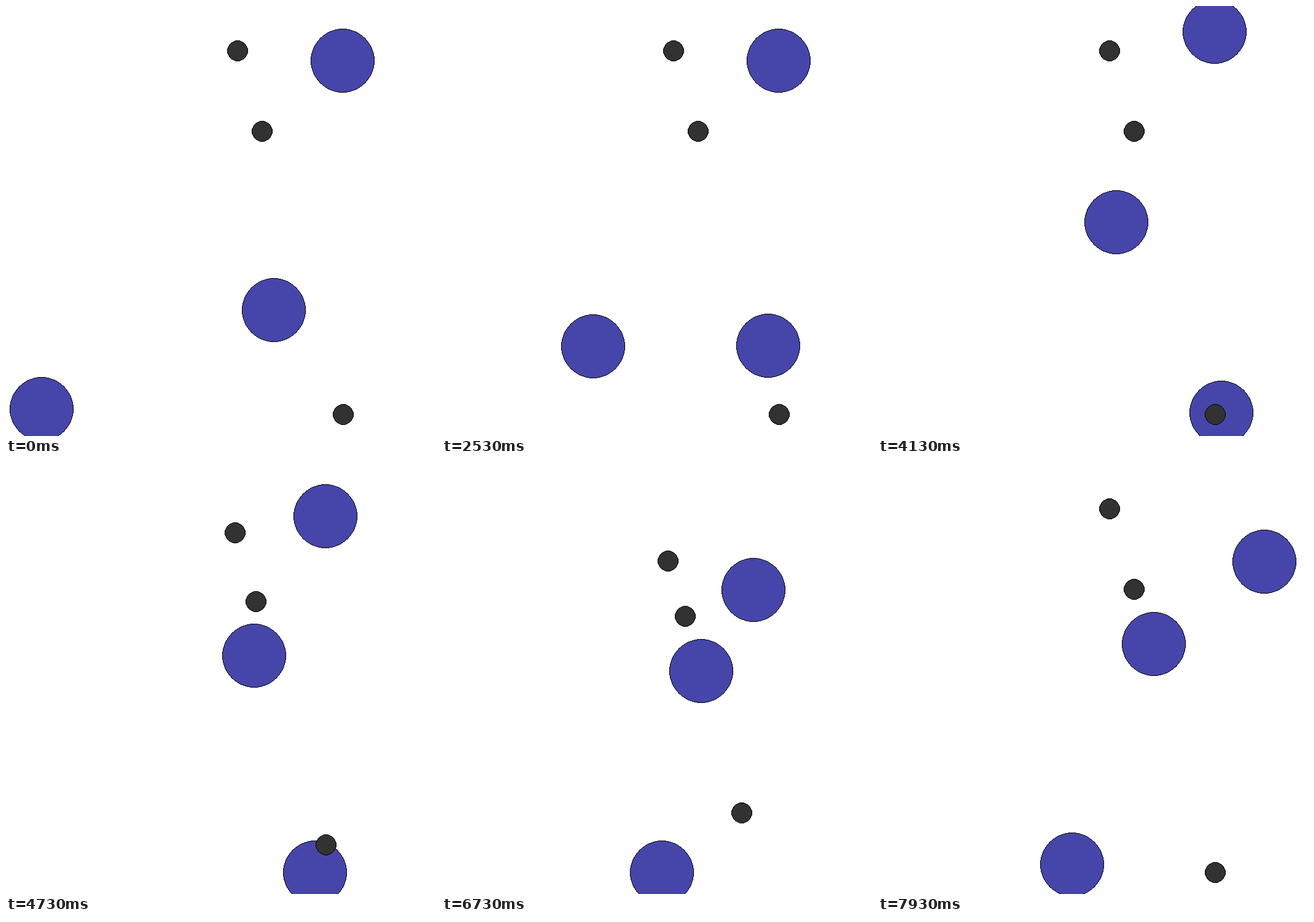
An HTML page for the animation above (8000 ms loop, 700 by 700 pixels).

```html
<!DOCTYPE html>
<html lang="en">
<head>
<meta charset="utf-8">
<title>Agents and landmarks</title>
<style>
  html, body { margin: 0; width: 100%; height: 100%; overflow: hidden; background: #fff; }
  svg { display: block; width: 100%; height: 100%; shape-rendering: crispEdges; }
  .agent { fill: #4646aa; }
  .landmark { fill: #323232; }
  .outline { fill: #000; }
</style>
</head>
<body>
<svg id="stage" viewBox="0 0 700 700"></svg>
<script>
const LOOP = 8000, STEP = 200, LEAD = 130;
const CENTER = 350, REACH = 315;

// Waypoints of each agent: step, then x and y from the centre.
const agents = [
  [[0, 198.5, -261], [12, 198.5, -261], [16, 198.5, -308], [23, 198.5, -308],
   [29, 218, -266.6], [36, 236.2, -180.3], [39, 279.5, -190.5]],
  [[0, 86.5, 145.5], [7, 102.5, 161.5], [16, 231.5, 253.5], [23, 178.9, 367.1],
   [29, 81.8, 510.5], [36, -23.7, 382.5], [39, -33.5, 302.5]],
  [[0, -291.5, 306.5], [7, -218.5, 289.5], [16, -14.5, 106.5], [23, 63.5, -43.7],
   [29, 85.1, -51], [36, 112.3, 4.3], [39, 99.5, -56.5]]
];
const landmarks = [[27, -276.7], [67, -145.8], [199.5, 315]];

// Monotone cubic through the waypoints on one axis, starting from rest.
function makeCurve(points, axis) {
  const last = points.length - 1;
  const rise = i =>
    (points[i + 1][axis] - points[i][axis]) / (points[i + 1][0] - points[i][0]);
  const slopes = points.map((_, i) => {
    if (i === 0) return 0;
    if (i === last) return rise(i - 1);
    const a = rise(i - 1), b = rise(i);
    return a * b > 0 ? 2 * a * b / (a + b) : 0;
  });
  return n => {
    let i = 0;
    while (i < last - 1 && n >= points[i + 1][0]) i++;
    const from = points[i], to = points[i + 1];
    const h = to[0] - from[0], u = (n - from[0]) / h, w = 1 - u;
    return from[axis] * w * w * (1 + 2 * u) + to[axis] * u * u * (3 - 2 * u)
      + h * u * w * (slopes[i] * w - slopes[i + 1] * u);
  };
}

const stage = document.getElementById('stage');
function addNode(parent, tag, attributes = {}) {
  const node = document.createElementNS(stage.namespaceURI, tag);
  for (const name in attributes) node.setAttribute(name, attributes[name]);
  return parent.appendChild(node);
}

// Disc of whole pixel rows with a one-pixel midpoint-circle outline.
function addDisc(kind, radius) {
  let rows = '', edge = '';
  const pixel = (x, y) => `M${x} ${y}h1v1h-1z`;
  const addRows = (half, offset) => {
    for (const y of [offset - 1, -offset]) {
      rows += `M${-half} ${y}h${2 * half}v1h${-2 * half}z`;
      edge += pixel(-half, y) + pixel(half - 1, y);
    }
  };
  for (let x = 0, y = radius; x < y;) {
    x++;
    y = Math.round(Math.sqrt(radius * radius - x * x));
    addRows(x, y);
    addRows(y, x);
  }
  const disc = addNode(stage, 'g');
  addNode(disc, 'path', { class: kind, d: rows });
  addNode(disc, 'path', { class: 'outline', d: edge });
  return disc;
}

const paths = agents.map(points => [makeCurve(points, 1), makeCurve(points, 2)]);
const discs = [
  ...agents.map(() => addDisc('agent', 52)),
  ...landmarks.map(() => addDisc('landmark', 17))
];

function draw(time) {
  const n = Math.max(0, Math.floor((time - LEAD) / STEP));
  const points = [...paths.map(path => path.map(axis => axis(n))), ...landmarks];
  // The camera zooms out so that the farthest point stays in view.
  const zoom = REACH / Math.max(REACH, ...points.flat().map(Math.abs));
  const toPixel = v => Math.floor(CENTER + v * zoom + 1e-6);
  points.forEach(([x, y], i) =>
    discs[i].setAttribute('transform', `translate(${toPixel(x)} ${toPixel(y)})`));
}

const start = performance.now();
function tick() {
  draw((performance.now() - start) % LOOP);
  requestAnimationFrame(tick);
}
tick();
</script>
</body>
</html>
```
